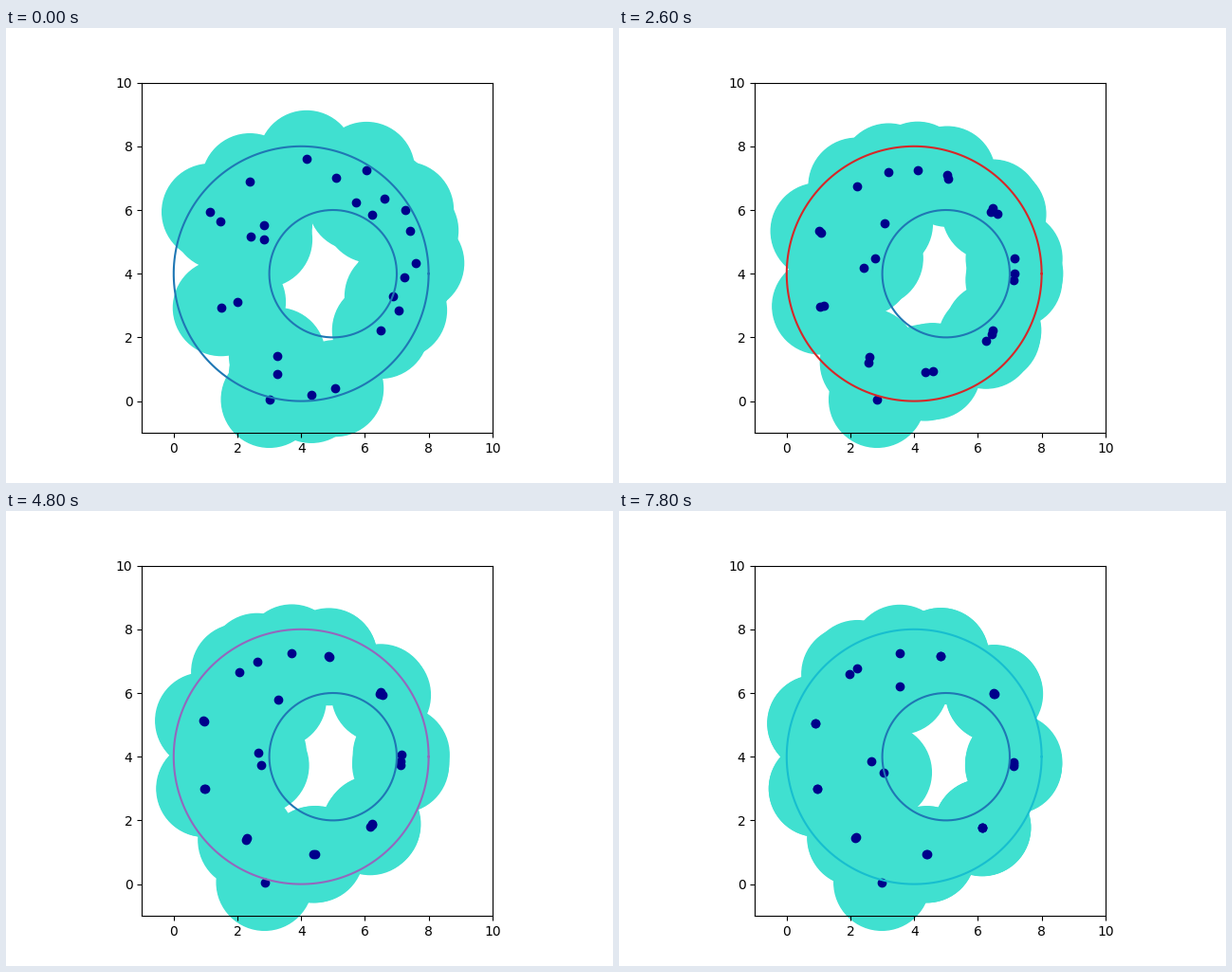
A matplotlib script for the animation above (8 s loop, 640 px wide and 480 px high).

```python
import numpy as np
import matplotlib.pyplot as plt
from matplotlib.animation import FuncAnimation
from matplotlib.patches import Circle

FRAMES = 40
SENSE = 1.5                         # sensing radius
HUB, ORBIT = (3.95, 4.09), 3.19     # circle on which the dots come to rest
DELAY = 3                           # frames before dots start to gather

# Each nest: resting angle, slowness, starting points of its dots
NESTS = [
    (130, 20, [(4.17, 7.61), (2.39, 6.89)]),
    (98, 10, [(5.10, 7.01)]),
    (74, 6.5, [(6.05, 7.25), (5.72, 6.24)]),
    (36.5, 12, [(6.61, 6.36), (6.23, 5.85), (7.27, 6.00)]),
    (-7, 15, [(7.42, 5.35), (7.60, 4.33), (7.24, 3.89)]),
    (-47, 9, [(6.88, 3.29), (7.06, 2.85), (6.49, 2.22)]),
    (-82, 10, [(5.07, 0.40), (4.32, 0.20)]),
    (-125, 11, [(3.25, 0.85), (3.25, 1.42)]),
    (-160, 6, [(1.49, 2.93), (2.00, 3.11)]),
    (163, 10, [(1.14, 5.94), (1.46, 5.64)]),
]


def ease(k, slowness):
    return 1 - np.exp(-max(k - DELAY, 0) / slowness)


def gather(k, start, angle, slowness):
    """Swing round the hub to the nest; dots outside the orbit fall in first."""
    dx, dy = np.subtract(start, HUB)
    r, a = np.hypot(dx, dy), np.arctan2(dy, dx)
    turn = (np.radians(angle) - a + np.pi) % (2 * np.pi) - np.pi
    a += turn * ease(k, slowness)
    pull = 1 - np.exp(-k / 4) if r > ORBIT else ease(k, slowness)
    r += (ORBIT - r) * pull
    return HUB[0] + r * np.cos(a), HUB[1] + r * np.sin(a)


def loners(k):
    """Three dots swaying beside the hole and one on the outer ring."""
    sway = np.cos(2 * np.pi * (k - 3) / 14)
    return [
        (2.83 + 0.0185 * k, 5.52 + 0.00024 * k ** 2 * (1 - sway)),
        (2.73 + 0.31 * np.tanh((k - 24) / 4), 5.17 - 1.75 * ease(k, 12)),
        (2.80 + 0.15 * sway, 5.08 - 1.40 * ease(k, 18)),
        (2.90 + 0.10 * np.cos(2 * np.pi * k / 36), 0.05),
    ]


def positions(k):
    pts = [gather(k, start, angle, slowness)
           for angle, slowness, starts in NESTS for start in starts]
    return np.array(pts + loners(k))


def ring(x, y, r):
    t = np.linspace(0, 2 * np.pi, 200)
    return ax.plot(x + r * np.cos(t), y + r * np.sin(t), color='C0')[0]


fig, ax = plt.subplots(figsize=(6.4, 4.8), dpi=100)
ax.set_aspect('equal')
ax.set(xlim=(-1, 10), ylim=(-1, 10),
       xticks=range(0, 11, 2), yticks=range(0, 11, 2))

first = positions(0)
discs = [ax.add_patch(Circle(p, SENSE, color='turquoise', clip_on=False))
         for p in first]
dots = ax.scatter(*first.T, color='darkblue')
outer = ring(4, 4, 4)
inner = ring(5, 4, 2)


def update(k):
    pts = positions(k)
    for disc, p in zip(discs, pts):
        disc.center = tuple(p)
    dots.set_offsets(pts)
    outer.set_color(f'C{k % 10}')
    return [*discs, dots, outer]


anim = FuncAnimation(fig, update, frames=FRAMES, interval=200,
                     repeat=True, repeat_delay=0)
plt.show()
```
